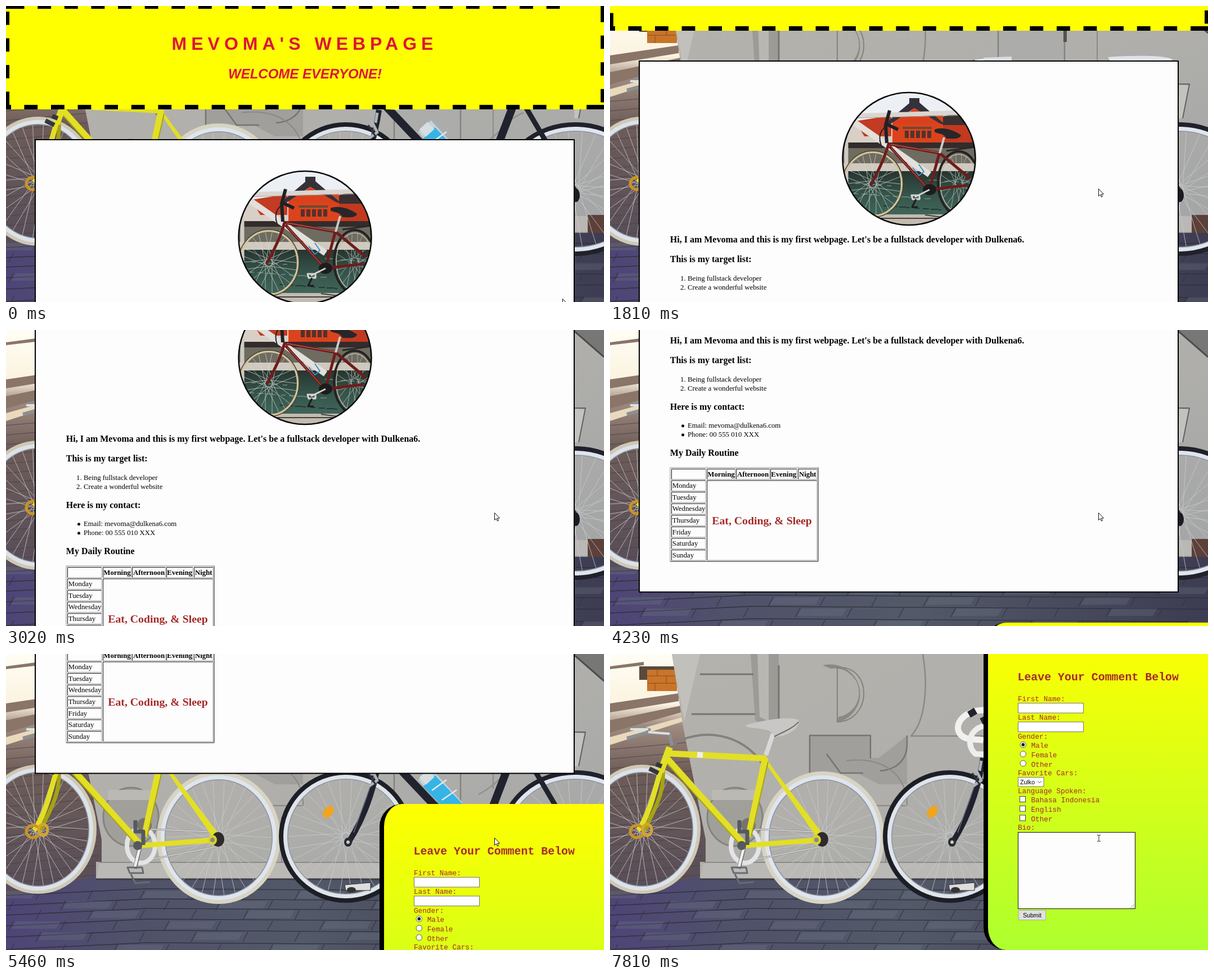
An HTML page that plays this animation: 1063x527 px, repeating every 8 s.

```html
<!DOCTYPE html>
<html lang="en">
<head>
<meta charset="utf-8">
<title>My first webpage</title>
<style>
html, body { margin: 0; width: 100%; height: 100%; overflow: hidden; background: #fff; }
svg { display: block; width: 100vw; height: 100vh; }
text { white-space: pre; }
.sans { font-family: "Liberation Sans", Arial, sans-serif; }
.serif { font-family: "Liberation Serif", "Times New Roman", serif; }
.mono { font-family: "Liberation Mono", "Courier New", monospace; }
</style>
</head>
<body>
<svg id="stage" viewBox="0 0 1063 527" preserveAspectRatio="none">
  <defs>
    <linearGradient id="lime" x1="0" y1="0" x2="0" y2="1">
      <stop offset="0" stop-color="#ff0"/><stop offset="1" stop-color="#adff2f"/>
    </linearGradient>
    <linearGradient id="wall" x1="0" y1="0" x2="1" y2="1">
      <stop offset="0" stop-color="#b4b2ad"/><stop offset=".5" stop-color="#b0afab"/><stop offset="1" stop-color="#a3a5a6"/>
    </linearGradient>
    <linearGradient id="walk" x1="0" y1="0" x2="0" y2="1">
      <stop offset="0" stop-color="#fffdf5"/><stop offset=".17" stop-color="#fbf3df"/>
      <stop offset=".24" stop-color="#a08b80"/><stop offset=".4" stop-color="#6d5c58"/>
      <stop offset=".75" stop-color="#5a4f58"/><stop offset="1" stop-color="#4d4670"/>
    </linearGradient>
    <linearGradient id="floor" x1="0" y1="0" x2="1" y2="0">
      <stop offset="0" stop-color="#4e4577"/><stop offset=".2" stop-color="#50516a"/>
      <stop offset=".5" stop-color="#535968"/><stop offset="1" stop-color="#3d3c52"/>
    </linearGradient>
    <linearGradient id="water" x1="0" y1="0" x2="0" y2="1">
      <stop offset="0" stop-color="#26342e"/><stop offset=".5" stop-color="#34534a"/><stop offset="1" stop-color="#41665a"/>
    </linearGradient>
    <clipPath id="round"><circle cx="531.5" cy="412" r="118"/></clipPath>
  </defs>
  <g id="photo"></g>
  <g id="page"></g>
  <g id="arrow"><path d="M.5 .5v13l3-2.8 2 4.4 2-.9-2-4.2h4z" fill="#fff" stroke="#111" stroke-width="1"/></g>
  <g id="beam"><path d="M866 322.5h2.2l.8.8.8-.8h2.2M869 323v10M866 333.5h2.2l.8-.8.8.8h2.2" fill="none" stroke="#222"/></g>
</svg>
<script>
const $ = id => document.getElementById(id);

// Drawing helpers, all returning SVG markup
const path = (d, stroke, w = 1, fill = 'none') =>
  `<path d="${d}" fill="${fill}" stroke="${stroke}" stroke-width="${w}" stroke-linejoin="round"/>`;
const shape = (d, fill) => `<path d="${d}" fill="${fill}"/>`;
const rect = (x, y, w, h, fill, stroke = 'none', sw = 1) =>
  `<rect x="${x}" y="${y}" width="${w}" height="${h}" fill="${fill}" stroke="${stroke}" stroke-width="${sw}"/>`;
const oval = (cx, cy, rx, ry, fill, stroke = 'none', w = 1) =>
  `<ellipse cx="${cx}" cy="${cy}" rx="${rx}" ry="${ry}" fill="${fill}" stroke="${stroke}" stroke-width="${w}"/>`;
const text = (s, x, y, size, font, fill = '#000', extra = '') =>
  `<text x="${x}" y="${y}" font-size="${size}" class="${font}" fill="${fill}" ${extra}>${s}</text>`;
const range = (n, f) => Array.from({ length: n }, (_, i) => f(i)).join('');
const BOLD = 'font-weight="bold"', MID = 'text-anchor="middle"';

function spokes(cx, cy, rx, ry, n, color, w) {
  let d = '';
  for (let i = 0; i < n; i++) {
    const a = i / n * 2 * Math.PI, b = a + (i % 2 ? 1.3 : -1.3);
    d += `M${(cx + 6 * Math.cos(b)).toFixed(1)} ${(cy + 6 * Math.sin(b)).toFixed(1)}`
       + `L${(cx + rx * Math.cos(a)).toFixed(1)} ${(cy + ry * Math.sin(a)).toFixed(1)}`;
  }
  return path(d, color, w);
}

function wheel(cx, cy, rx, ry, tyre, tw, rim) {
  return spokes(cx, cy, rx - 14, ry - 14, 30, '#c9cbcc', .8)
    + oval(cx, cy, rx - tw - 4, ry - tw - 4, 'none', '#8d949c', 9)
    + oval(cx, cy, rx - tw - 3, ry - tw - 3, 'none', rim, 8)
    + oval(cx, cy, rx - tw / 2, ry - tw / 2, 'none', tyre, tw);
}

function ground() {
  let s = rect(0, 0, 1063, 527, 'url(#walk)');
  s += shape('M0 88L122 70V84L0 104ZM0 118L126 92V104L0 140ZM0 22L60 14V20L0 27Z', '#8a7568');
  s += shape('M0 148L130 112V120L0 162Z', '#e9d9bd');
  s += range(15, i => path(`M0 ${170 + i * 17}L165 ${155 + i * 17}`, '#473f47', .8));
  s += rect(66, 27, 53, 39, '#c8752a') + path('M66 39h53M66 52h53M84 27v12M100 39v13M80 52v14', '#8c4a20');
  s += shape('M52 22H120V28H66V46H52Z', '#5a4a3c');
  s += shape('M0 434L160 396L664 402L1063 400V527H0Z', 'url(#floor)');
  const rows = [418, 436, 453, 472, 492, 514];
  s += rows.map((y, r) => path(`M0 ${y + 12}L250 ${y}L1063 ${y + 5}`, '#30323f', 1.4)
    + range(13, i => {
      const x = i * 92 - 30 + r % 2 * 44;
      return path(`M${x} ${y + 3}l-9 17`, '#343644', 1.2)
        + (i % 3 === r % 3 ? shape(`M${x + 3} ${y + 4}h80l-8 13h-80z`, '#747c8c40') : '');
    })).join('');
  return s;
}

function wall() {
  let s = shape('M110 0H1063V404L664 402L160 400V370H170V330L130 130Z', 'url(#wall)');
  s += shape('M110 0H160L132 120Z', '#c2c0ba');
  s += shape('M250 0H300V142L258 118Z', '#9d9b97') + shape('M262 0H282V120L266 112Z', '#b9b7b2');
  s += path('M160 36H255M145 107H258M300 20V145', '#77746f', 3);
  s += shape('M378 20A52 51 0 0 1 404 122L406 112A42 42 0 0 0 392 26Z', '#8c8984');
  s += path('M404 24C467 20 467 118 404 121Z', '#85827d', 2);
  s += path('M556 0C566 60 560 120 535 146H690', '#8b8984', 2.5);
  s += shape('M355 145H463V185H478L528 145V232H478L440 212H355Z', '#a09f9b');
  s += path('M355 212V145H463V186M385 178L410 212H450M528 145V160C528 190 508 206 480 208', '#76746f', 2.5);
  s += path('M110 162C160 130 235 140 270 195', '#84817c', 4);
  s += oval(222, 290, 49, 52, '#a09f9a', '#85837e', 3);
  s += shape('M181 242h84v18h-84z', '#bbb9b4');
  s += path('M420 190C500 180 530 230 528 270H470M490 290V370', '#8a8883', 2);
  s += shape('M690 0H808V400H690Z', '#acacaa') + path('M690 0V400M808 0V400', '#83827f', 2.5);
  s += rect(806, 38, 6, 26, '#55524f') + path('M866 0V240M920 190C890 200 880 230 840 250', '#8b8b89', 2);
  s += shape('M1008 0H1063V48Z', '#777876') + path('M1008 0L1063 48', '#4b4c4d', 3);
  s += shape('M1012 140L1030 142L1018 200H1010Z', '#c2c3be') + path('M1010 139H1030L1018 200', '#5f6264', 2);
  s += rect(1012, 374, 22, 28, '#b9b8b5') + rect(1034, 372, 29, 32, '#5c4039');
  s += shape('M166 372H664V400H160Z', '#bab9b5') + path('M166 371H1010', '#8b8a86', 2) + path('M160 401H664', '#3d3e45', 3);
  return s;
}

function yellowBike() {
  const c = '#e2df25', dark = '#a5a313';
  let s = wheel(57, 312, 104, 115, '#cfc8b4', 6, '#dce2ea') + wheel(378, 327, 110, 118, '#d8d4c4', 7, '#dfe5ee');
  s += path('M238 311L375 317M245 368L375 343', '#878a8c', 3) + path('M238 311L375 317M245 368L375 343', '#ddd', 1.4);
  s += oval(240, 341, 25, 31, 'none', '#e2e4e6', 8) + oval(246, 305, 13, 13, '#77736f');
  s += path('M94 205C98 255 70 290 62 314', dark, 7) + path('M91 203C78 250 68 290 50 314', c, 9);
  s += path('M277 190L368 322M287 205L378 325', c, 6) + path('M240 341L372 331', c, 9);
  s += path('M276 184L246 325', c, 11) + path('M281 192L251 325', dark, 2);
  s += path('M101 186L237 338', c, 12) + path('M96 189L232 340', dark, 2);
  s += path('M104 177L278 186', c, 11) + path('M155 179l10 1', '#eee', 10);
  s += path('M106 166L90 210', c, 12);
  s += path('M290 142L277 180', '#d9d9d9', 8) + shape('M241 127C270 118 318 110 334 117C341 126 325 145 292 148C290 132 266 134 244 130Z', '#c8c7c5');
  s += path('M292 147C310 138 328 130 335 121', '#696764', 2);
  s += path('M34 135C50 128 62 133 72 136M110 163L106 142L66 140L30 150', '#8b8f93', 6);
  s += path('M36 134L68 134M68 139L106 142', '#dfe0df', 4) + path('M70 204l16 8M82 196l10 4', '#34373b', 8);
  s += oval(48, 316, 12, 11, 'none', '#c99424', 5) + oval(66, 313, 8, 10, 'none', '#d5a530', 5);
  s += oval(377, 330, 11, 13, '#2d2c2b') + oval(367, 331, 8, 9, '#d8d42b') + oval(367, 331, 4, 4, '#888');
  s += path('M230 296v20h14v24M238 344L229 382', '#555a5f', 7) + path('M238 344L229 380', '#eee', 5);
  s += oval(234, 341, 8, 8, '#55585c') + path('M216 380h26l2 10h-24zM222 392l8 16 26-2', '#666b70', 3);
  return s;
}

function blackBike() {
  const c = '#20222d';
  let s = wheel(604, 325, 119, 118, '#1d1f27', 8, '#dfe4ea') + wheel(1012, 326, 135, 119, '#20212a', 8, '#dfe5ef');
  s += path('M602 411l46-4v14h-44z', '#333', 1, '#ddd') + oval(614, 420, 8, 5, '#333');
  s += path('M663 185C655 240 638 290 608 337', c, 10) + path('M655 215L618 318', '#6c7080', 1.5);
  s += path('M672 175L760 268L835 335', c, 14) + path('M912 150L868 265L838 335', c, 14);
  s += path('M915 165L1012 330M838 335L1012 335', c, 9) + path('M678 165L912 170', c, 12);
  s += path('M744 214L800 275', '#c5d2da', 31) + path('M752 226L802 278', '#35b4e6', 29);
  s += path('M742 213l12 13', '#d8dde0', 20) + path('M757 243l26-19M775 260l26-18', '#e4e9ec', 2.5);
  s += path('M920 120L908 160', '#ccc', 8) + shape('M885 91C930 88 985 87 1000 95C990 106 960 106 945 112L890 100Z', '#dfe2e8');
  s += path('M664 100C630 100 610 125 622 142C632 156 654 150 664 154', '#f1f1ef', 11);
  s += path('M664 128C636 136 634 165 650 178L700 180', '#eeeeec', 10);
  s += path('M638 108l12-7M660 120l12-6', '#22242b', 12) + path('M664 96L714 94', '#d9dde2', 8);
  s += path('M650 205l10 20 -14 10M660 190l-3 18', '#aeb3b8', 5) + path('M644 212l14 22', '#30323a', 3);
  s += `<ellipse cx="573" cy="281" rx="8" ry="12" fill="#f0a51c" transform="rotate(38 573 281)"/>`;
  s += oval(608, 335, 7, 8, '#292b32') + oval(608, 335, 3, 3, '#ccc') + oval(1013, 337, 7, 12, '#1b1c22');
  return s;
}

function portrait() {
  const c = '#6e1c1c';
  let s = rect(412, 290, 240, 244, '#eceff3');
  s += rect(412, 349, 240, 46, '#d8cfc6') + shape('M436 345L500 335V372H452Z', '#c23b22') + rect(592, 345, 58, 40, '#c13a20');
  s += shape('M592 337L620 328L636 352H592Z', '#3b3030');
  s += rect(502, 334, 90, 49, '#dc431c') + shape('M486 352L532 313V304H550V312L597 352L585 349L541 322L500 349Z', '#35313a');
  s += shape('M503 350L541 322L588 350Z', '#d9411d') + path('M520 357H572', '#6b4a35', 4);
  s += range(5, i => rect(524 + i * 10, 362, 7, 13, '#54322c'));
  s += rect(412, 383, 240, 10, '#332c2b') + rect(412, 393, 240, 27, '#6e6b60');
  s += rect(412, 433, 240, 80, 'url(#water)');
  s += range(34, i => path(`M${425 + i * 67 % 215} ${437 + i * 23 % 70}h${5 + i % 4 * 3}`, i % 3 ? '#6d8f82' : '#1d2d28', 1.3));
  s += rect(412, 420, 240, 14, '#d0c9bf') + path('M412 336L652 329', '#dad5d0', 8) + path('M412 340L652 334', '#a69f98', 1);
  s += path('M430 344L568 440', '#e3dfdb', 11) + path('M420 350V480', '#d0cac4', 7);
  s += rect(412, 511, 240, 22, '#c3bbb0') + path('M412 518H652M440 511l40 9M560 512l60 8', '#433f3d', 2);
  s += spokes(467, 457, 50, 54, 26, '#d9d9d2', .7) + oval(467, 457, 52, 57, 'none', '#d2c39d', 4) + oval(467, 457, 54, 59, 'none', '#47402f', 1.5);
  s += spokes(620, 455, 34, 52, 22, '#c3c6c0', .7) + oval(620, 455, 37, 56, 'none', '#242322', 4) + oval(620, 455, 33, 51, 'none', '#c0b9a4', 1.5);
  s += path('M496 383C488 412 474 440 463 459', c, 5) + path('M497 386L586 402M586 400L568 466M497 390L567 467M586 402L640 447M568 467L636 459', c, 5);
  s += path('M499 386L585 401M500 393L564 464', '#c27465', 1) + path('M594 374L586 402', '#cbcbc8', 4);
  s += shape('M577 360C590 354 612 361 624 370C622 378 608 376 598 376C594 366 582 368 577 364Z', '#282629');
  s += path('M492 384L490 352L497 326M491 350L512 360', '#202126', 6) + path('M482 388C474 366 488 350 500 354', '#222', 2);
  s += path('M538 428l11 14 9-7-9-13', '#3e8fc4', 2) + path('M598 398L649 391V408', '#28282a', 3);
  s += oval(568, 467, 12, 10, '#1d1c1c') + path('M568 467L542 480M536 477h14v7h-12z', '#d7d5ce', 3) + path('M544 484l-7 14h10', '#1d1c1c', 3);
  return `<g clip-path="url(#round)">${s}</g>` + oval(531.5, 412, 118, 118, 'none', '#0b0b0b', 2.5);
}

function header() {
  let s = rect(0, 0, 1063, 184, '#ff0');
  s += range(21, i => rect(8.7 + i * 47.6, 0, 23.8, 5, '#000'));
  s += range(22, i => rect(32.4 + i * 47.6, 176, 23.8, 8, '#000'));
  s += range(4, i => rect(0, 10 + i * 47.5, 6, 23.7, '#000') + rect(1057, 5 + i * 47.6, 6, 23.7, '#000'));
  s += rect(0, 0, 9, 5, '#000') + rect(0, 176, 9, 8, '#000') + rect(1054, 176, 9, 8, '#000') + rect(1057, 0, 6, 6, '#000');
  s += text("MEVOMA'S WEBPAGE", 294.6, 78, 32, 'sans', '#dc143c', BOLD + ' letter-spacing="8"');
  return s + text('WELCOME EVERYONE!', 531.5, 129, 24, 'sans', '#dc143c', BOLD + ' font-style="italic" ' + MID);
}

// Table cell with dark top-left and grey bottom-right edges
const cell = (x, y, w, h, a = '#111', b = '#9a9a9a') =>
  path(`M${x} ${y + h}V${y}H${x + w}`, a) + path(`M${x + w} ${y}V${y + h}H${x}`, b);

function table() {
  let s = cell(107, 782, 263, 167, '#8a8a8a', '#111');
  s += cell(109.5, 784.5, 60.5, 18.5);
  const heads = [['Morning', 172.5, 50], ['Afternoon', 224.5, 59], ['Evening', 285.5, 46.5], ['Night', 334.5, 33.5]];
  for (const [name, x, w] of heads)
    s += cell(x, 784.5, w, 18.5) + text(name, x + w / 2, 797.5, 12.8, 'serif', '#000', BOLD + ' ' + MID);
  const days = ['Mon', 'Tues', 'Wednes', 'Thurs', 'Fri', 'Satur', 'Sun'];
  days.forEach((d, i) => {
    const y = 805 + i * 20.6;
    s += cell(109.5, y.toFixed(1) * 1, 60.5, 18.5) + text(d + 'day', 110.8, y + 13.2, 12.8, 'serif');
  });
  s += cell(172.5, 805, 195.5, 142);
  return s + text('Eat, Coding, &amp; Sleep', 270, 882.5, 19.8, 'serif', '#a52a2a', BOLD + ' ' + MID);
}

function about() {
  let s = rect(52, 238, 958, 765.5, '#fdfdfd', '#000', 2) + portrait();
  const heads = [
    ["Hi, I am Mevoma and this is my first webpage. Let's be a fullstack developer with Dulkena6.", 561],
    ['This is my target list:', 596], ['Here is my contact:', 678.5], ['My Daily Routine', 761]];
  for (const [h, y] of heads) s += text(h, 106.8, y, 16, 'serif', '#000', BOLD);
  ['Being fullstack developer', 'Create a wonderful website'].forEach((l, i) => {
    const y = 629 + i * 16;
    s += text(i + 1 + '.', 134.6, y, 12.8, 'serif', '#000', 'text-anchor="end"') + text(l, 138, y, 12.8, 'serif');
  });
  ['Email: mevoma@dulkena6.com', 'Phone: 00 555 010 XXX'].forEach((l, i) => {
    const y = 711.3 + i * 16;
    s += oval(129.5, y - 3.6, 2.5, 2.5, '#000') + text(l, 138, y, 12.8, 'serif');
  });
  return s + table();
}

function form() {
  const c = '#a52a2a', top = 1101;
  const label = (s, y, x = 725) => text(s, x, top + y, 12.7, 'mono', c);
  let s = shape('M704 1058A40 40 0 0 0 664 1098V1588A40 40 0 0 0 704 1628Z', '#000');
  s += shape('M704 1058A32 40 0 0 0 672 1098V1588A32 40 0 0 0 704 1628H1063V1058Z', 'url(#lime)');
  s += text('Leave Your Comment Below', 724.5, top + 46.5, 19.9, 'mono', c, BOLD);
  s += label('First Name:', 83.5) + label('Last Name:', 117) + label('Gender:', 150.5)
     + label('Favorite Cars:', 215.5) + label('Language Spoken:', 247.5) + label('Bio:', 312.5);
  for (const y of [87.5, 121]) s += rect(725.5, top + y, 116, 17.5, '#fff', '#777');
  ['Male', 'Female', 'Other'].forEach((l, i) => {
    const y = 162 + i * 16.6;
    s += oval(734.3, top + y - .5, 5.2, 5.2, '#fff', '#555') + label(l, y + 5.3, 748.7);
  });
  s += oval(734.3, top + 161.5, 2.9, 2.9, '#222');
  s += rect(725.5, top + 219.5, 45.5, 16.5, '#fff', '#777') + text('Zulko', 729, top + 231.8, 10.67, 'sans')
     + path(`M760.5 ${top + 226.3}l3.3 3.3 3.3-3.3`, '#444');
  ['Bahasa Indonesia', 'English', 'Other'].forEach((l, i) => {
    const y = 253.5 + i * 16.7;
    s += rect(728.5, top + y, 10, 10, '#fff', '#444') + label(l, y + 10.7, 748.5);
  });
  s += `<rect id="bio" x="725.5" y="${top + 317.5}" width="208" height="136" fill="#fdfdfd"/>`;
  s += range(6, i => rect([930, 927, 930, 924, 927, 930][i], top + [445, 448, 448, 451, 451, 451][i], 1.3, 1.3, '#777'));
  s += rect(726.5, top + 456.5, 48, 17, '#e1e1e1', '#adadad');
  return s + text('Submit', 750.5, top + 469, 10.67, 'sans', '#000', MID);
}

$('photo').innerHTML = ground() + wall() + yellowBike() + blackBike();
$('page').innerHTML = header() + about() + form();

// Stepped motion: start, end, number of steps, target, ease-out power
const scrolls = [
  [1220, 1810, 8, 140, 1], [1880, 2050, 3, 173, 1], [2210, 3020, 12, 362, 2],
  [3560, 4230, 9, 537, 1], [4330, 4330, 1, 552, 1], [4390, 4640, 4, 605, 1],
  [4940, 5460, 8, 791, 1], [5570, 5640, 2, 815, 1], [6150, 6380, 4, 950, 1],
  [6570, 6570, 1, 982, 1], [6650, 6740, 2, 997, 1], [7020, 7500, 6, 1090, 1], [7640, 7810, 3, 1101, 1]];

function progress(t, start, end, n, power) {
  if (t < start) return 0;
  const i = end > start ? Math.floor((t - start) / (end - start) * (n - 1) + 1e-6) + 1 : n;
  return 1 - (1 - Math.min(i, n) / n) ** power;
}

function scrollAt(t) {
  let y = 0;
  for (const [start, end, n, to, power] of scrolls) y += (to - y) * progress(t, start, end, n, power);
  return Math.round(y);
}

function draw(t) {
  const y = scrollAt(t), p = progress(t, 70, 610, 8, 1.4), typing = t >= 6570;
  $('page').setAttribute('transform', `translate(0 ${-y})`);
  $('arrow').setAttribute('transform', `translate(${989 - 121 * p} ${521 - 196 * p + (t >= 4940 ? 2 : 0)})`);
  $('arrow').style.display = typing ? 'none' : '';
  $('beam').style.display = typing ? '' : 'none';
  $('bio').setAttribute('stroke', y > 1091 ? '#111' : '#777');
}

const began = performance.now();
function tick() {
  draw((performance.now() - began) % 8000);
  requestAnimationFrame(tick);
}
tick();
</script>
</body>
</html>
```
